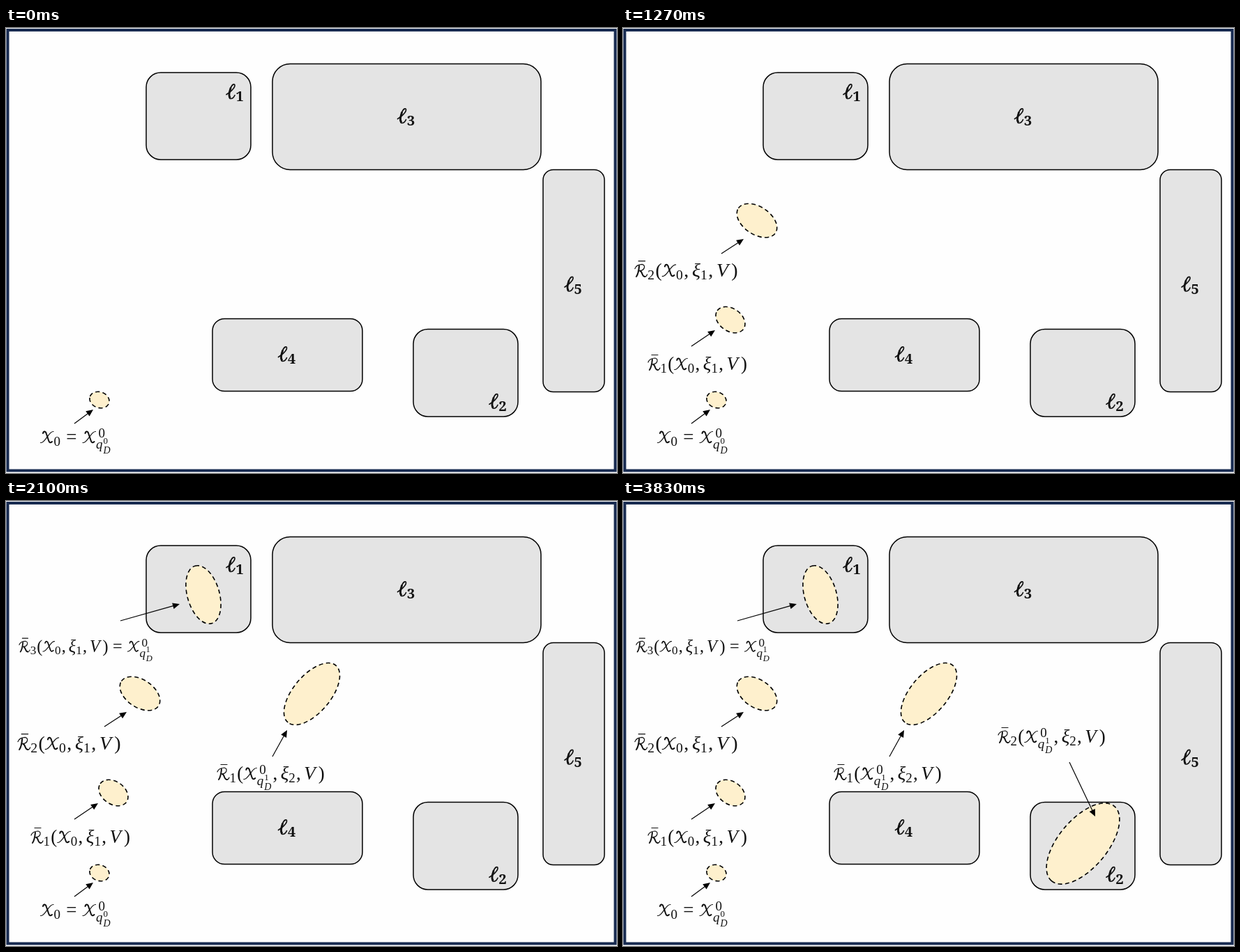
An HTML page with a canvas that plays this animation: 876 px wide and 639 px high, repeating every 4000 ms.

```html
<!DOCTYPE html>
<html lang="en">
<head>
<meta charset="utf-8">
<title>Reachable sets</title>
<style>
html, body { margin: 0; width: 100%; height: 100%; overflow: hidden; background: #fefefe; }
canvas { display: block; }
</style>
</head>
<body>
<canvas id="stage" width="876" height="639"></canvas>
<script>
const ctx = document.getElementById("stage").getContext("2d");
const STEP = 500, LOOP = 4000;
const INK = "#111", NAVY = "#172a50", GREY = "#e4e4e4", CREAM = "#fef0cd";

// Script letters that the installed fonts lack: heavy and light pen strokes
const letter = (width, heavy, light) => ({ width, heavy: new Path2D(heavy), light: new Path2D(light) });
const script = {
  R: letter(18.5, "M7 -15Q6 -4 3 0M8 -8C12 -7 10 0 15 0",
    "M1 -11C2 -15 7 -17 11 -17C16 -16 15 -9 8 -8M15 0Q17 0 18 -3M6 -21.5H15"),
  X: letter(19.5, "M4 -14C5 -18 8 -17 9 -13L12 -4C13 0 15 0 17 -2",
    "M19 -16.5C15 -17 12 -11 9.5 -8S4 0 .5 -.5"),
  ℓ: letter(13.5, "M6 -6C4 1 3 4 5 7", "M0 3C5 0 12 -6 12 -10C12 -13 8 -12 6 -6C3 2 3 9 6 9Q10 9 12 4")
};

function drawScript(name, x, y, weight = 1) {
  const { width, heavy, light } = script[name];
  ctx.save();
  ctx.translate(x, y);
  ctx.strokeStyle = INK;
  ctx.lineCap = "round";
  ctx.lineWidth = 2 * weight;
  ctx.stroke(heavy);
  ctx.lineWidth = 1.2 * weight;
  ctx.stroke(light);
  ctx.restore();
  return x + width;
}

// Draws text and returns the x where it ends
function text(s, x, y, size, style = "", family = "Liberation Serif") {
  ctx.font = `${style} ${size}px "${family}", serif`;
  ctx.fillStyle = INK;
  ctx.fillText(s, x, y);
  return x + ctx.measureText(s).width;
}

// "q1" stands for superscript 0 above q with its own indices; other digits are subscripts
function formula(s, x, y, scale = 1) {
  const gapAfter = { ",": 4.5, V: 4, "=": 8 };
  let at = 0;
  ctx.save();
  ctx.translate(x, y);
  ctx.scale(scale, scale);
  for (const token of s.match(/q.|./g)) {
    if (script[token]) at = drawScript(token, at, 0);
    else if (/\d$/.test(token) && token.length > 1) {
      text("0", at + 3.5, -8.5, 19);
      at = text("q", at, 8, 19, "italic") + 1;
      text(token[1], at, 1, 13);
      at = text("D", at, 15, 14, "italic") + 2;
    }
    else if (/\d/.test(token)) at = text(token, at, 4, 19) + 1.3;
    else {
      if (token === "=") at += 7;
      at = text(token, at, 0, 27, /[ξV]/.test(token) ? "italic" : "") + (gapAfter[token] || 0);
    }
  }
  ctx.restore();
}

function region(name, x, y, w, h, dx = 0, dy = 0) {
  ctx.beginPath();
  ctx.roundRect(x, y, w, h, Math.min(w, h) / 6);
  ctx.fillStyle = GREY;
  ctx.fill();
  ctx.lineWidth = 1.5;
  ctx.stroke();
  const cx = x + w / 2 + dx, cy = y + h / 2 + dy;
  const end = drawScript("ℓ", cx - 13, cy, 1.4);
  text(name, end, cy + 12.5, 20, "bold", "Noto Serif");
}

function ellipse(x, y, radius, ratio, tilt) {
  ctx.beginPath();
  ctx.ellipse(x, y, radius, radius * ratio, tilt * Math.PI / 180, Math.PI, 3 * Math.PI);
  ctx.fillStyle = CREAM;
  ctx.fill();
  ctx.lineWidth = 1.6;
  ctx.setLineDash([6, 4.4]);
  ctx.stroke();
  ctx.setLineDash([]);
}

function arrow(x, y, tipX, tipY) {
  const length = Math.hypot(tipX - x, tipY - y);
  ctx.save();
  ctx.translate(x, y);
  ctx.rotate(Math.atan2(tipY - y, tipX - x));
  ctx.lineWidth = 1.2;
  ctx.stroke(new Path2D(`M0 0H${length - 8}`));
  ctx.fillStyle = "#000";
  ctx.fill(new Path2D(`M${length} 0l-10 -4.5v9Z`));
  ctx.restore();
}

// Each stop: centre, long radius and tilt; arrow; formula
const stops = [
  ratio => {
    ellipse(134, 534, 14.4, ratio, 20);
    arrow(98, 568, 125, 548);
    formula("X0=Xq0", 49, 596);
  },
  ratio => {
    ellipse(154, 419, 23, ratio, 35);
    arrow(98, 457, 132, 434);
    formula("R1(X0,ξ1,V)", 35, 491);
  },
  ratio => {
    ellipse(192, 276.5, 32, ratio, 34);
    arrow(141, 324, 173, 303);
    formula("R2(X0,ξ1,V)", 16, 357, 1.04);
  },
  ratio => {
    ellipse(283, 134.5, 43, ratio, 74);
    arrow(164, 172, 249, 148);
    formula("R3(X0,ξ1,V)=Xq1", 18, 216.5, 0.9);
  },
  ratio => {
    ellipse(438.5, 277, 53.5, ratio, -50);
    arrow(382, 367, 403, 329);
    formula("R1(Xq1,ξ2,V)", 302, 400);
  },
  ratio => {
    ellipse(659.5, 492, 70, ratio, -50);
    arrow(640, 375, 677, 453);
    formula("R2(Xq1,ξ2,V)", 537, 347);
  }
];

function draw() {
  const shown = Math.floor(performance.now() % LOOP / STEP) + 1;
  ctx.fillStyle = "#fefefe";
  ctx.fillRect(0, 0, 876, 639);
  ctx.strokeStyle = NAVY;
  ctx.lineWidth = 4;
  ctx.strokeRect(2.5, 3, 871, 632.5);
  ctx.strokeStyle = "#000";
  region("1", 201, 64, 150, 125, 53, -34);
  region("2", 584, 432.5, 150, 125.5, 47, 42);
  region("3", 382, 51.5, 385, 152);
  region("4", 296, 417.5, 215, 104);
  region("5", 770, 203.5, 88, 319, 0, 6);
  // Later sets grow more slender, down to half as wide as long
  stops.slice(0, shown).forEach((stop, i) => stop(Math.max(0.5, 0.79 - 0.085 * i)));
  requestAnimationFrame(draw);
}
draw();
</script>
</body>
</html>
```
